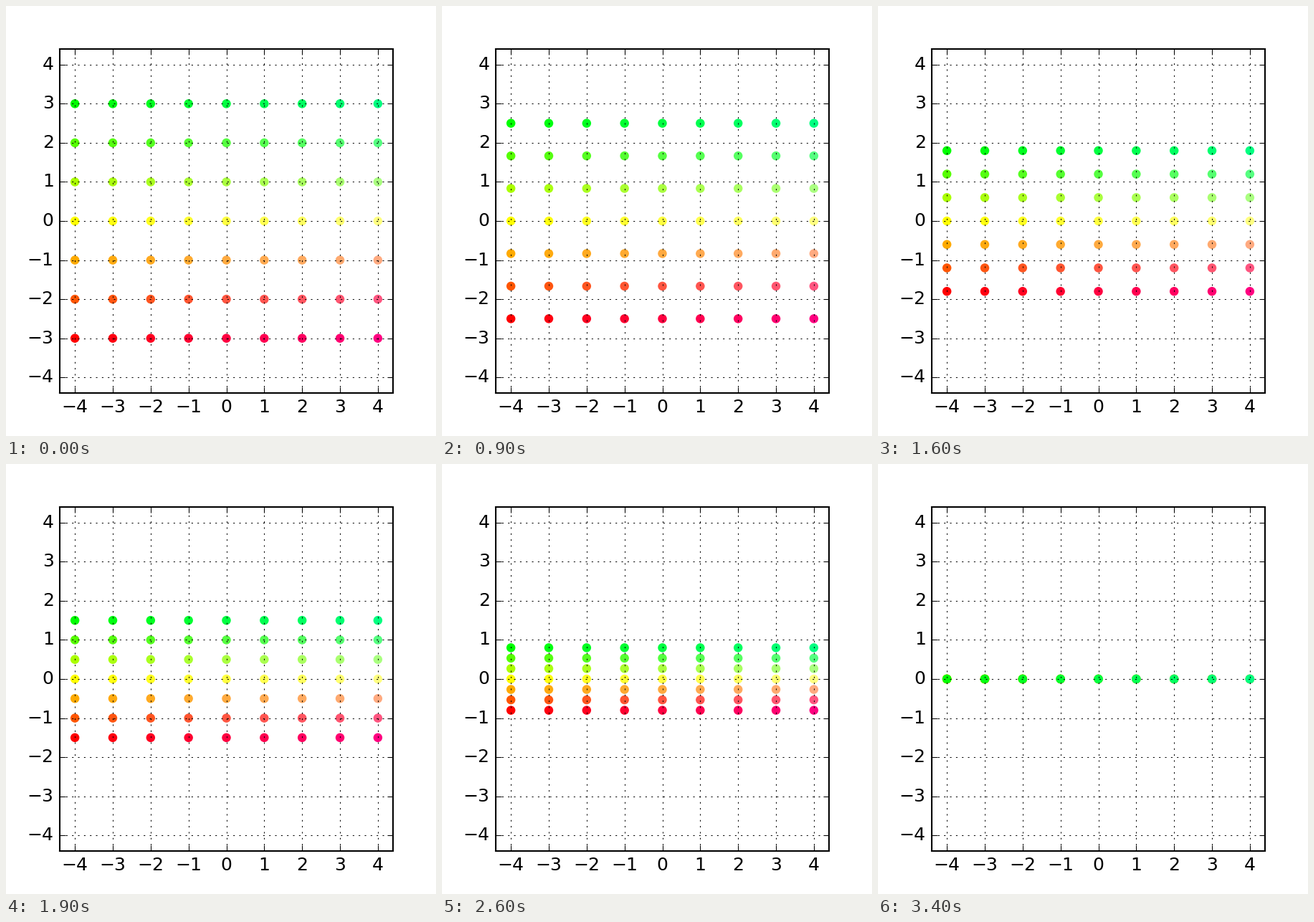
These frames come from a looping animation (600 px wide and 600 px high, 3.9 s). A matplotlib script:

```python
import numpy as np
import matplotlib.pyplot as plt
from matplotlib.animation import FuncAnimation

FRAMES, INTERVAL = 39, 100
HOLD, STEPS = 4, 30  # frames of rest before the squash, steps it takes

plt.rcParams.update({
    "font.family": "DejaVu Sans",
    "font.size": 12,
    "axes.linewidth": 1.0,
    "axes.axisbelow": False,
    "axes.unicode_minus": True,
    "lines.scale_dashes": False,
    "text.kerning_factor": 6,
    "xtick.alignment": "center",
    "ytick.alignment": "center",
})

fig = plt.figure(figsize=(4, 4), dpi=150, facecolor="white")
ax = fig.add_axes([0.125, 0.1, 0.775, 0.8])
ax.set(xlim=(-4.4, 4.4), ylim=(-4.4, 4.4),
       xticks=range(-4, 5), yticks=range(-4, 5))
ax.tick_params(direction="in", top=True, right=True,
               length=4, width=0.5, pad=4)
ax.grid(True, color="black", linestyle=(0, (1, 3)), linewidth=0.5)

# Rows run bottom to top, so upper dots cover lower ones.
x, y = (a.ravel() for a in np.meshgrid(np.arange(-4, 5), np.arange(-3, 4)))
colors = np.column_stack([
    np.clip(1 - y / 3, 0, 1),
    np.clip(1 + y / 3, 0, 1),
    (x + 4) / 16,
])
dots = ax.scatter(x, y, s=36, c=colors, edgecolors="none", zorder=1)


def update(n):
    scale = 1 - np.clip(n - HOLD, 0, STEPS) / STEPS
    dots.set_offsets(np.column_stack([x, y * scale]))
    return (dots,)


anim = FuncAnimation(fig, update, frames=FRAMES, interval=INTERVAL,
                     init_func=lambda: update(0), repeat=True, repeat_delay=0)
plt.show()
```
